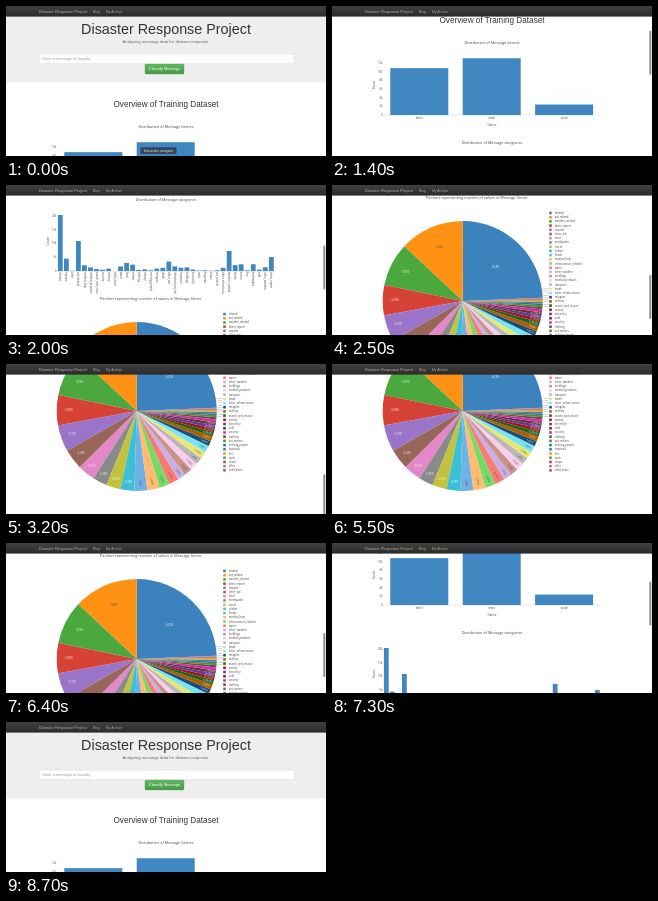
An HTML page that plays this animation: 320 by 151 pixels, repeating every 8800 ms.

```html
<!DOCTYPE html>
<html lang="en">
<head>
<meta charset="utf-8">
<title>Disaster Response Project</title>
<style>
  html, body { margin: 0; width: 100%; height: 100%; overflow: hidden; background: #fff; }
  svg { display: block; width: 100vw; height: 100vh; }
  text { font-family: "Liberation Sans", Arial, sans-serif; }
  .plot { font-family: "Open Sans", Verdana, sans-serif; }
</style>
</head>
<body>
<svg id="stage" viewBox="0 0 320 151">
  <defs>
    <linearGradient id="navFill" x2="0" y2="1">
      <stop stop-color="#414141"/><stop offset="1" stop-color="#2b2b2b"/>
    </linearGradient>
    <linearGradient id="buttonFill" x2="0" y2="1">
      <stop stop-color="#62b962"/><stop offset="1" stop-color="#459a45"/>
    </linearGradient>
    <clipPath id="categoryClip"><rect x="40" y="212" width="240" height="103"/></clipPath>
  </defs>
  <rect width="320" height="151" fill="#fff"/>
  <g id="page"></g>
  <rect id="thumb" x="317.3" width="2" height="44" rx="1" fill="#8e8e8e"/>
  <g id="nav"></g>
  <rect y="150" width="320" height="1" fill="#000"/>
</svg>
<script>
const LOOP = 8800, STEP = 100, VIEW = 151, PAGE = 515;
const BLUE = '#4086c0';
const byId = id => document.getElementById(id);
const page = byId('page'), nav = byId('nav'), thumb = byId('thumb');

function add(parent, tag, attrs, content) {
  const node = document.createElementNS('http://www.w3.org/2000/svg', tag);
  for (const key in attrs) node.setAttribute(key, attrs[key]);
  if (content) node.textContent = content;
  parent.appendChild(node);
  return node;
}
const rect = (parent, x, y, width, height, fill, rest) =>
  add(parent, 'rect', { x, y, width, height, fill, ...rest });
const label = (parent, x, y, size, content, rest) =>
  add(parent, 'text', { x, y, 'font-size': size, fill: '#333', ...rest }, content);
const plotLabel = (parent, x, y, size, content, rest) =>
  label(parent, x, y, size, content, { class: 'plot', fill: '#444', ...rest });
const middle = { 'text-anchor': 'middle' };
const end = { 'text-anchor': 'end' };

// name: message count, largest first
const counts = {
  related: 20282, aid_related: 10860, weather_related: 7297, direct_report: 5075,
  request: 4474, other_aid: 3446, food: 2923, earthquake: 2455, storm: 2443,
  shelter: 2314, floods: 2155, medical_help: 2084, infrastructure_related: 1705,
  water: 1672, other_weather: 1376, buildings: 1333, medical_products: 1313,
  transport: 1201, death: 1194, other_infrastructure: 1151, refugees: 875,
  military: 860, search_and_rescue: 724, money: 604, electricity: 532, cold: 530,
  security: 471, clothing: 405, aid_centers: 309, missing_people: 298,
  hospitals: 283, fire: 282, tools: 159, shops: 120, offer: 118, child_alone: 0
};
const columns = ('related request offer aid_related medical_help medical_products ' +
  'search_and_rescue security military child_alone water food shelter clothing money ' +
  'missing_people refugees death other_aid infrastructure_related transport buildings ' +
  'electricity tools hospitals shops aid_centers other_infrastructure weather_related ' +
  'floods storm fire earthquake cold other_weather direct_report').split(' ');

function header() {
  rect(page, 0, 0, 320, 76.5, '#eee');
  label(page, 160, 28, 14.35, 'Disaster Response Project', middle);
  label(page, 159.5, 37.4, 4.2, 'Analyzing message data for disaster response', { ...middle, fill: '#666' });
  rect(page, 33.5, 48.2, 254.5, 9.4, '#fff', { rx: 1.3, stroke: '#ccc', 'stroke-width': .3 });
  label(page, 36.5, 54.2, 3.9, 'Enter a message to classify', { fill: '#999' });
  rect(page, 139, 58, 39, 10, 'url(#buttonFill)', { rx: 1.2, stroke: '#3e8f3e', 'stroke-width': .3 });
  label(page, 158.5, 64.4, 4, 'Classify Message', { ...middle, fill: '#fff' });
  label(page, 160, 101.2, 8.2, 'Overview of Training Dataset', middle);
}

function axes(title, titleY, base, tick, ticks, unit) {
  plotLabel(page, 160, titleY, 3.78, title, middle);
  for (let i = 0; i <= ticks; i++) {
    const y = base - i * tick;
    rect(page, 51.5, y - .1, 217, .2, i ? '#f0f0f0' : '#888');
    plotLabel(page, 50.4, y + 1, 2.65, i ? i * unit + 'k' : '0', end);
  }
  const y = base - 30;
  plotLabel(page, 43, y, 3.1, 'Count', { ...middle, transform: `rotate(-90 43 ${y})` });
}

function genreChart() {
  axes('Distribution of Message Genres', 122.3, 193, 8.7, 6, 2);
  [['direct', 10.77], ['news', 13.05], ['social', 2.4]].forEach(([name, thousands], i) => {
    const x = 58.3 + i * 72.4, height = thousands * 4.35;
    rect(page, x, 193 - height, 58, height, BLUE);
    plotLabel(page, x + 29, 197.2, 2.65, name, middle);
  });
  plotLabel(page, 160, 204.2, 3.1, 'Genre', middle);
}

function categoryChart() {
  axes('Distribution of Message categories', 221.8, 292, 13.8, 4, 5);
  const names = add(page, 'g', { 'clip-path': 'url(#categoryClip)' });
  columns.forEach((name, i) => {
    const x = 51.9 + i * 6.03, height = counts[name] / 362;
    rect(page, x, 292 - height, 4.8, height, BLUE);
    plotLabel(names, x + 1.5, 293, 2.65, name, { transform: `rotate(90 ${x + 1.5} 293)` });
  });
}

// ten hues, then a lighter and a darker round of the same hues
const hues = [[207, 52, 49], [32, 100, 54], [113, 46, 45], [4, 67, 53], [267, 43, 62],
  [13, 26, 47], [317, 61, 71], [0, 0, 54], [60, 52, 50], [188, 64, 53]];
const rounds = [[1, 0], [1.35, 18], [1.2, -20], [1, 0]];
function sliceColor(i) {
  const [h, s, l] = hues[i % 10], [vivid, lift] = rounds[Math.floor(i / 10)];
  return `hsl(${h} ${Math.min(100, s * vivid)}% ${l + lift}%)`;
}

function pieChart() {
  const cx = 130.7, cy = 423, radius = 80;
  const entries = Object.entries(counts);
  const total = entries.reduce((sum, [, n]) => sum + n, 0);
  const at = (turn, r) => [cx + r * Math.sin(turn * 2 * Math.PI), cy - r * Math.cos(turn * 2 * Math.PI)];
  const labels = [];
  let turn = entries[0][1] / total;
  plotLabel(page, 144.5, 321.3, 3.78, 'Piechart representing number of values in Message Genre', middle);

  entries.forEach(([name, n], i) => {
    const share = n / total, from = turn - share, mid = turn - share / 2;
    const color = sliceColor(i);
    if (n) {
      add(page, 'path', {
        d: `M${cx} ${cy}L${at(from, radius)}A${radius} ${radius} 0 0 1 ${at(turn, radius)}Z`, fill: color
      });
      labels.push({ share, mid, i });
    }
    turn = from;
    const y = 335 + i * 4.21;
    rect(page, 217.2, y - 1.3, 2.6, 2.6, color);
    plotLabel(page, 222.8, y + 1, 2.65, name);
  });

  let stacked = 0;
  labels.forEach(({ share, mid, i }) => {
    const percent = (share * 100).toPrecision(3) + '%';
    if (share < .0062) {
      plotLabel(page, cx + radius - .5, cy + 6 - 2.3 * stacked++, 1.9, percent, { fill: '#777' });
      return;
    }
    const [x, y] = at(mid, radius * Math.max(.59, .94 - 1.6 * share));
    let angle = share < .027 ? ((mid + 1) % 1) * 360 - 90 : 0;
    if (angle > 90) angle -= 180;
    plotLabel(page, x, y + .9, 2.65, percent, {
      ...middle,
      fill: i === 1 || (i > 9 && i < 20) ? '#444' : '#fff',
      transform: `rotate(${angle} ${x} ${y})`
    });
  });
}

function navBar() {
  rect(nav, 0, 0, 320, 10.6, 'url(#navFill)');
  label(nav, 33, 6.9, 4.05, 'Disaster Response Project', { fill: '#b4b4b4' });
  label(nav, 87, 6.8, 3.3, 'Blog', { fill: '#a6a6a6' });
  label(nav, 100, 6.8, 3.3, 'My Archive', { fill: '#a6a6a6' });
}

header();
genreChart();
categoryChart();
pieChart();
navBar();

const hint = add(page, 'g');
rect(hint, 134.5, 141.3, 36, 6.6, '#34465a', { rx: .8 });
label(hint, 152.5, 145.8, 3.3, 'Interactive navigator', { ...middle, fill: '#e4e8ec' });

// time, scroll offset, speed per ms
const path = [[750, 0, 0], [1400, 84, .19], [2500, 307, .19], [3000, 376, 0],
  [5850, 376, 0], [6400, 307, -.18], [7300, 131, -.19], [8100, 0, 0]];
function scrollAt(t) {
  const k = path.findIndex(p => p[0] >= t);
  if (k < 1) return 0;
  const [t0, y0, v0] = path[k - 1], [t1, y1, v1] = path[k];
  const d = t1 - t0, u = (t - t0) / d, w = 1 - u;
  return w * w * (1 + 2 * u) * y0 + u * u * (3 - 2 * u) * y1 + d * u * w * (w * v0 - u * v1);
}
const clamp = v => Math.min(1, Math.max(0, v));
const shown = (t, start, stop) => clamp((t - start) / 100) * clamp((stop - t) / 250);

function draw(now) {
  const t = Math.floor(now % LOOP / STEP) * STEP;
  const y = scrollAt(t);
  page.setAttribute('transform', `translate(0 ${-y})`);
  thumb.setAttribute('y', y * VIEW / PAGE);
  thumb.setAttribute('opacity', Math.max(shown(t, 700, 3700), shown(t, 5800, 8600)));
  hint.setAttribute('opacity', clamp(1 - t / 200));
  requestAnimationFrame(draw);
}
draw(performance.now());
</script>
</body>
</html>
```
